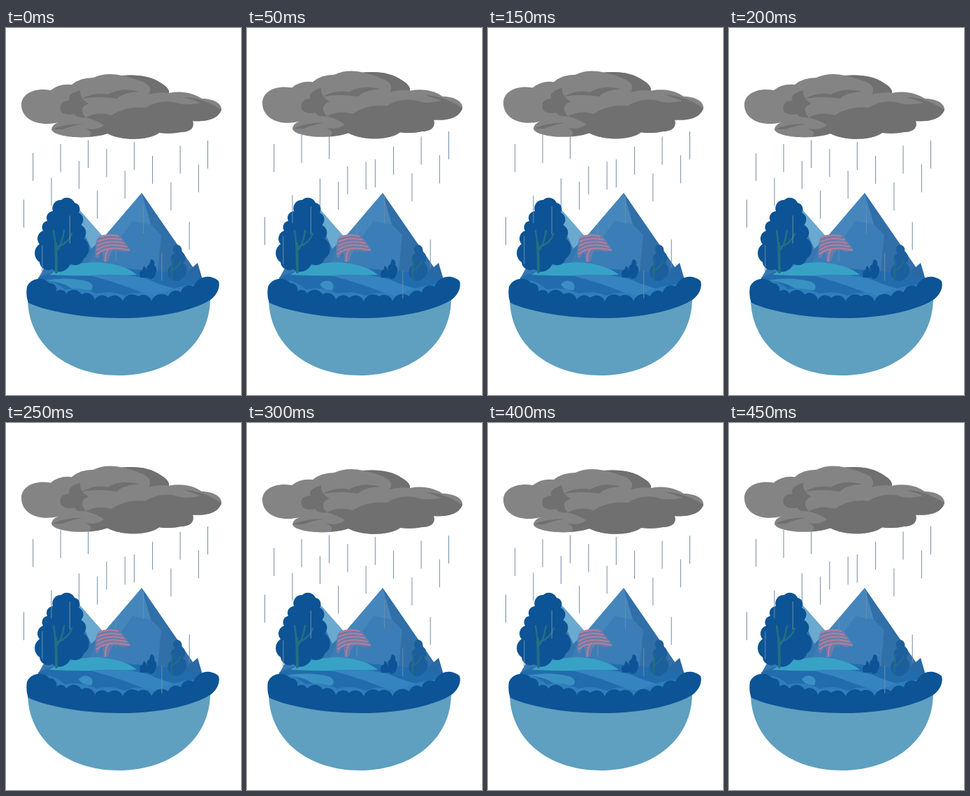
An HTML page that plays this animation: 336 by 525 pixels, repeating every 0.5 s.

```html
<!DOCTYPE html>
<html lang="en">
<head>
<meta charset="utf-8">
<title>Rain over a small world</title>
<style>
  html, body { margin: 0; width: 100%; height: 100%; overflow: hidden; background: #fff; }
  svg { display: block; width: 336px; height: 525px; }
</style>
</head>
<body>
<svg viewBox="0 0 336 525">
  <path id="bowl" fill="#5f9fc0" d="M31 386C31 454 88 497 161 497S292 454 292 386Z"/>

  <g id="mountains">
    <path fill="#3577b0" d="M45 360L103 258 139 299 170 365Z"/>
    <path fill="#6aa9d0" d="M103 258L139 299 122 316 110 290Z"/>
    <path fill="#3b7db7" d="M194 236L278 358 230 380H100L130 311Z"/>
    <path fill="#316fa9" d="M194 236L278 358H216L222 296 207 281Z"/>
    <path fill="#4586bd" d="M194 236L207 281 181 276 160 305 130 311Z"/>
    <path fill="#2868a5" d="M258 350L274 336 281 360H255Z"/>
  </g>

  <g id="ground">
    <path fill="#226cae" d="M46 357Q105 330 180 345Q240 348 280 360L272 390H48Z"/>
    <path fill="#38a2c6" d="M62 353Q86 336 130 335Q170 338 187 353Q126 356 62 353Z"/>
    <path fill="#3583bf" d="M120 354Q185 349 216 365Q247 376 263 376L210 385Q170 367 120 354Z"/>
    <path class="pose" fill="#3991c2" d="M55 361Q90 355 118 363Q127 368 122 375Q98 376 91 371Q83 364 55 361Z"/>
    <path class="pose" fill="#3b8fc4" d="M104 367Q112 358 121 364Q126 369 122 375Q110 376 104 367Z"/>
  </g>

  <g id="trees" fill="#0c5496">
    <path id="bigTree"/>
    <path id="smallTree" fill="#1c5f9d"/>
    <path d="M207 331Q213 331 212 339Q217 344 214 351Q213 358 206 359Q199 356 202 348Q200 340 205 338ZM197 340Q203 344 202 357H192Q189 348 195 346Z"/>
    <g fill="none" stroke="#236f84" stroke-linecap="round">
      <path stroke-width="4" d="M72 349Q72 330 71 308"/>
      <path stroke-width="2.5" d="M71 314Q70 302 68 290M72 319Q80 311 83 290M74 313Q89 308 94 294"/>
      <path stroke-width="2" d="M237 361Q236 344 238 331M237 347Q247 342 250 333"/>
    </g>
  </g>

  <g id="cloth">
    <path fill="#6a7cab" d="M132 298Q147 293 163 296Q168 303 177 316V319Q165 322 157 317Q149 318 147 332Q143 337 139 334Q140 322 136 319Q132 334 128 328Q126 309 132 298Z"/>
    <path id="stripes" fill="none" stroke="#b07f9d" stroke-width="2.2"/>
  </g>

  <g id="rim">
    <path fill="#2f7ebb" d="M52 361Q70 360 84 374Q109 369 129 380Q151 375 169 383Q191 374 213 384Q243 368 272 367L240 395H70Z"/>
    <path id="foam" fill="#0c5496"/>
  </g>

  <path class="rain" fill="none" stroke="#718ca5"/>
  <path class="rain" fill="none" stroke="#718ca5"/>

  <g id="cloud">
    <path fill="#848484" d="M22 110C22 94 41 85 64 89Q76 79 94 81Q106 71 125 71Q143 63 166 68C188 66 208 69 222 79Q234 86 233 93Q260 88 280 101C296 101 309 108 308 117C303 131 286 134 267 133Q271 148 250 149Q237 152 219 150C204 161 166 162 145 151C117 161 67 156 65 145Q66 138 75 135C47 142 22 131 22 110Z"/>
    <g fill="#707070">
      <path d="M165 68C188 66 208 69 222 79Q234 86 233 93Q218 91 204 95Q212 82 190 75Q180 71 165 68Z"/>
      <path d="M106 89Q86 95 91 104Q75 104 78 118Q82 126 98 123Q99 129 114 128Q102 114 118 108Q105 101 106 89Z"/>
      <path d="M114 128Q132 119 151 125Q171 111 200 114Q216 103 240 106Q254 112 278 107Q266 102 254 99Q280 99 308 117C303 131 286 134 267 133Q271 148 250 149Q237 152 219 150C204 161 166 162 145 151Q133 155 119 155Q126 149 113 144Q131 147 140 139Q130 132 114 128Z"/>
      <path d="M109 101Q128 91 146 95Q164 84 191 91Q167 92 159 101Q133 97 109 101ZM66 145Q83 137 110 137Q90 141 81 145Z"/>
    </g>
  </g>
</svg>
<script>
  const byId = id => document.getElementById(id);
  const setPath = (el, d) => el.setAttribute('d', d);

  // Chain of round bumps through a few corner points
  function puffs(corners) {
    const pts = corners.split(' ').map(p => p.split(',').map(Number));
    return pts.map(([x, y], i) => {
      if (!i) return `M${x} ${y}`;
      const r = 0.6 * Math.hypot(x - pts[i - 1][0], y - pts[i - 1][1]);
      return `A${r} ${r} 0 0 1 ${x} ${y}`;
    }).join('');
  }

  setPath(byId('bigTree'), puffs('48,335 48,309 53,290 59,276 67,262 79,246 98,250 104,264 107,282 111,301 111,330 92,337 66,345 48,335') + 'Z');
  setPath(byId('smallTree'), puffs('234,357 239,338 241,322 243,310 251,320 253,336 252,358 234,357') + 'Z');
  setPath(byId('foam'), puffs('30,370 62,365 72,377 86,380 108,381 127,389 146,386 167,391 189,384 208,391 232,384 250,378 268,370 304,362')
    + 'C307 371 301 383 292 389C264 406 213 415 163 415C103 415 52 403 32 393Q28 384 30 370Z');

  let stripes = '';
  for (let i = 0; i < 5; i++) {
    stripes += `M${131 - i / 2} ${300 + i * 6}Q${148 - i} ${294 + i * 4} ${161 + i * 4} ${298 + i * 5}`;
  }
  setPath(byId('stripes'), stripes + 'M148 315Q141 321 142 334');

  // Golden-ratio scatter; every third streak falls while the others hop back
  const rain = document.querySelectorAll('.rain');
  rain.forEach((path, pose) => {
    let d = '';
    for (let i = 0; i < 21; i++) {
      const spread = (0.72 + i * 0.618) % 1;
      const top = 160 + 165 * spread ** 2 + pose * (i % 3 ? -13 : 25);
      d += `M${25.5 + i * 13.15} ${top}v40`;
    }
    setPath(path, d);
  });

  const patches = document.querySelectorAll('.pose');
  const cloud = byId('cloud');

  function draw() {
    const pose = Math.floor(performance.now() % 500 / 50) % 2;
    for (const set of [rain, patches]) {
      set.forEach((el, i) => el.style.display = i === pose ? '' : 'none');
    }
    cloud.setAttribute('transform', pose ? 'translate(0 -7.3) scale(1 1.043)' : '');
    requestAnimationFrame(draw);
  }
  draw();
</script>
</body>
</html>
```
